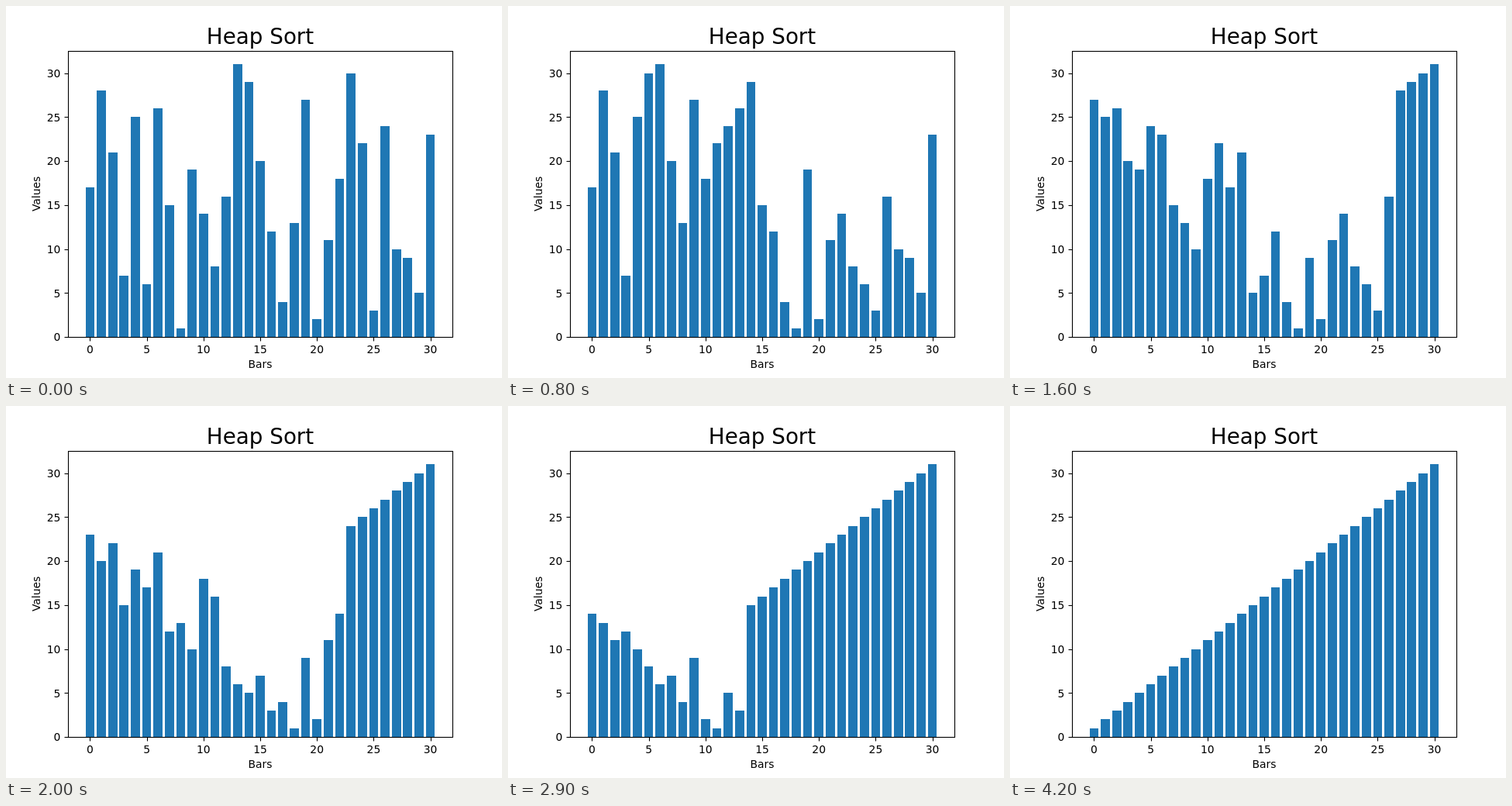
Recreate the animation shown at these times as an HTML page with a canvas. Size 640 by 480 pixels, loop 4.3 s.

```html
<!DOCTYPE html>
<html lang="en">
<head>
<meta charset="utf-8">
<title>Heap Sort</title>
<style>
  html, body { margin: 0; width: 100%; height: 100%; overflow: hidden; background: #fff; }
  canvas { display: block; }
</style>
</head>
<body>
<canvas id="chart" width="640" height="480"></canvas>
<script>
const STEP_MS = 100;
const START = [17, 28, 21, 7, 25, 6, 26, 15, 1, 19, 14, 8, 16, 31, 29, 20,
  12, 4, 13, 27, 2, 11, 18, 30, 22, 3, 24, 10, 9, 5, 23];
const ctx = document.getElementById('chart').getContext('2d');

const swap = (a, i, j) => { [a[i], a[j]] = [a[j], a[i]]; };

// Moves a[i] down to its place in the heap of the given size; true if it moved.
function siftDown(a, i, size) {
  let moved = false;
  for (;;) {
    let top = i;
    for (const child of [2 * i + 1, 2 * i + 2]) {
      if (child < size && a[child] > a[top]) top = child;
    }
    if (top === i) return moved;
    swap(a, i, top);
    i = top;
    moved = true;
  }
}

// One snapshot per effective sift while building, then one per extraction.
function heapSortStates(values) {
  const a = [...values];
  const states = [[...a]];
  for (let i = (a.length >> 1) - 1; i >= 0; i--) {
    if (siftDown(a, i, a.length)) states.push([...a]);
  }
  for (let end = a.length - 1; end > 0; end--) {
    swap(a, 0, end);
    siftDown(a, 0, end);
    states.push([...a]);
  }
  return states;
}

const LEFT = 80, RIGHT = 576, TOP = 57.6, BOTTOM = 427.2;
const xAt = v => LEFT + (v + 1.94) * (RIGHT - LEFT) / 33.88;
const yAt = v => BOTTOM - v * (BOTTOM - TOP) / 32.55;

function line(x1, y1, x2, y2) {
  ctx.beginPath();
  ctx.moveTo(x1, y1);
  ctx.lineTo(x2, y2);
  ctx.stroke();
}

function label(text, x, y, align = 'center', size = 13.89) {
  ctx.font = `${size}px "DejaVu Sans", sans-serif`;
  ctx.textAlign = align;
  ctx.fillText(text, x, y);
}

function drawBars(values) {
  ctx.fillStyle = '#1f77b4';
  values.forEach((v, i) => {
    const x = Math.round(xAt(i - 0.4)), y = Math.round(yAt(v));
    ctx.fillRect(x, y, Math.round(xAt(i + 0.4)) - x, 427 - y);
  });
}

function drawAxes() {
  ctx.fillStyle = ctx.strokeStyle = '#000';
  ctx.lineWidth = 1.11;
  ctx.strokeRect(80.5, 58.5, 496, 369);
  for (let v = 0; v <= 30; v += 5) {
    const x = Math.round(xAt(v)) + 0.5, y = Math.round(yAt(v)) + 0.5;
    line(x, 427.5, x, 432.5);
    line(75.5, y, 80.5, y);
    label(v, xAt(v), 448);
    label(v, 70.3, Math.round(yAt(v) + 5.2), 'right');
  }
  label('Heap Sort', 328, 49, 'center', 27.78);
  label('Bars', 328, 467);
  ctx.save();
  ctx.translate(44, 242.4);
  ctx.rotate(-Math.PI / 2);
  label('Values', 0, 0);
  ctx.restore();
}

const states = heapSortStates(START);

function render() {
  const step = Math.floor(performance.now() / STEP_MS) % states.length;
  ctx.fillStyle = '#fff';
  ctx.fillRect(0, 0, 640, 480);
  drawBars(states[step]);
  drawAxes();
  requestAnimationFrame(render);
}
render();
</script>
</body>
</html>
```
